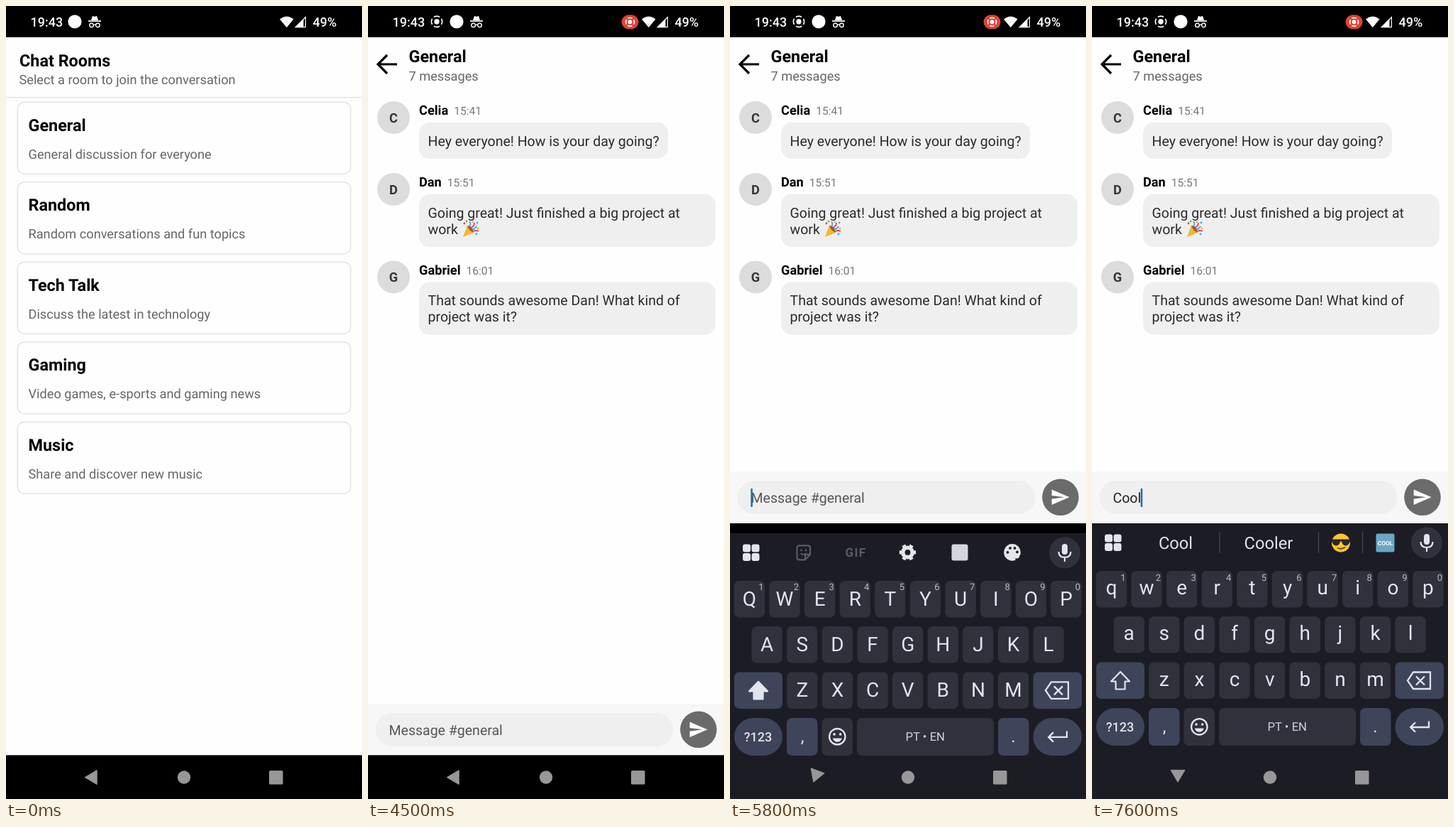
An HTML page for the animation above (8 s loop, 502 px wide and 1116 px high).

```html
<!DOCTYPE html>
<html lang="en">
<head>
<meta charset="utf-8">
<title>Chat rooms</title>
<style>
html, body { margin: 0; width: 100%; height: 100%; overflow: hidden; background: #fefefe; }
svg { display: block; width: 100%; height: 100%; }
text { font-family: Roboto, sans-serif; white-space: pre; text-rendering: geometricPrecision; }
</style>
</head>
<body>
<svg id="stage" viewBox="0 0 502 1116"></svg>
<script>
const LOOP = 8000, STEP = 100;
const SMALL = 18.2, BODY = 19.52, TITLE = 23.4;
const BAR_RISE = 327, KEYBOARD_TOP = 728, KEYBOARD_HEIGHT = 388;
const KEY = '#31313b', ACTION = '#3e4459', INK = '#e4e4ee', PANEL = '#1c1c25';

// Moments in ms
const RECORDING = 80, PRESS = 2800, ENTER = 2900, FOCUS = 5600, KEYBOARD = 5650, TYPE = 6800;

const text = (x, y, size, fill, str, extra = '') =>
  `<text x="${x}" y="${y}" font-size="${size}" fill="${fill}" ${extra}>${str}</text>`;
const bold = 'font-weight="700"', middle = 'text-anchor="middle"';
const rect = (x, y, w, h, r, fill, extra = '') =>
  `<rect x="${x}" y="${y}" width="${w}" height="${h}" rx="${r}" fill="${fill}" ${extra}/>`;
const disc = (x, y, r, fill, extra = '') => `<circle cx="${x}" cy="${y}" r="${r}" fill="${fill}" ${extra}/>`;
const line = (d, color, width, extra = '') =>
  `<path d="${d}" fill="none" stroke="${color}" stroke-width="${width}" ${extra}/>`;
const shape = (d, fill) => `<path d="${d}" fill="${fill}"/>`;
const group = (id, content, extra = '') => `<g id="${id}" ${extra}>${content}</g>`;
const at = (x, y, content) => `<g transform="translate(${x} ${y})">${content}</g>`;

// Status and navigation bars
const recordMark = r => disc(0, 0, r * .48, '#fff') +
  disc(0, 0, r, 'none', 'stroke="#fff" stroke-width="1.7" pathLength="8" stroke-dasharray="1.45 .55" stroke-dashoffset=".72"');

function statusBar() {
  const incognito = shape('M-5 -2 -3 -8 0 -7 3 -8 5 -2Z', '#fff') +
    line('M-9 -.8H9', '#fff', 1.8) +
    line('M-1.6 4.8Q0 3.6 1.6 4.8', '#fff', 1.2) +
    [-4.4, 4.4].map(x => disc(x, 5, 2.8, 'none', 'stroke="#fff" stroke-width="1.4"')).join('');
  return rect(0, 0, 502, 44, 0, '#000') +
    text(34.5, 29.3, 18, '#fff', '19:43', 'font-weight="500"') +
    at(97, 22, group('record', recordMark(7.6))) +
    group('notices', disc(97, 22, 9.6, '#fff') + at(125, 22, incognito)) +
    at(369.5, 22.5, group('chip', rect(-12, -10, 24, 20, 10, '#e24234') + recordMark(6))) +
    shape('M386 18.5Q395.7 10.8 405.5 18.5L395.8 30.3Z', '#fff') +
    shape('M407 30.3 419.5 18V30.3Z', '#fff') +
    line('M408.5 29.7 422.4 15.8V29.7Z', '#fff', 1.2) +
    text(432.5, 29.3, 18, '#fff', '49%', 'font-weight="500"');
}

const navButtons = () =>
  group('back', '<path d="M-8.7 0 8.2-10V10Z" fill="#979797" stroke="#979797" stroke-linejoin="round"/>') +
  disc(251, 1085.5, 9.2, '#979797') + rect(371, 1076, 19.5, 19.5, 1.5, '#979797');

// Room list
const rooms = [
  ['General', 'General discussion for everyone'],
  ['Random', 'Random conversations and fun topics'],
  ['Tech Talk', 'Discuss the latest in technology'],
  ['Gaming', 'Video games, e-sports and gaming news'],
  ['Music', 'Share and discover new music']
];

const roomList = () =>
  text(19, 84.5, TITLE, '#000', 'Chat Rooms', bold) +
  text(18.5, 110.3, SMALL, '#666', 'Select a room to join the conversation') +
  rect(0, 128, 502, 1.3, 0, '#e1e1e1') +
  rooms.map(([name, about], i) => at(0, i * 112.5, group('room' + i,
    rect(16.2, 135.3, 469.8, 101, 10, '#fefefe', 'stroke="#e0e0e0" stroke-width="1.3"') +
    text(31.5, 175.8, TITLE, '#000', name, bold) +
    text(31.5, 214.8, SMALL, '#666', about)))).join('');

// Chat
const popper = () => shape('M1 23 7 7Q14 10 16 17Z', '#f5b62e') +
  shape('M7 7Q15 7 16 17Q9 14 7 7Z', '#9a5a32') +
  line('M10 8Q13 5 10 1M14 12Q18 12 20 8', '#4fa3e3', 1.8) +
  line('M12 10Q17 8 17 3M16 15Q19 13 23 15', '#e0455c', 1.8) +
  [[3, 4, '#e0455c'], [15, 2, '#f5b62e'], [21, 3, '#4fa3e3'], [22, 11, '#f5b62e'], [20, 19, '#4fa3e3'], [6, 1, '#5fb85a']]
    .map(([x, y, c]) => disc(x, y, 1.4, c)).join('');

const messages = [
  { y: 157, name: 'Celia', time: '15:41', width: 351, lines: ['Hey everyone! How is your day going?'] },
  { y: 258, name: 'Dan', time: '15:51', width: 418, lines: ['Going great! Just finished a big project at', 'work'] },
  { y: 381.6, name: 'Gabriel', time: '16:01', width: 418, lines: ['That sounds awesome Dan! What kind of', 'project was it?'] }
];

const message = ({ y, name, time, width, lines }) => at(0, y,
  disc(36, 0, 23, '#dcdcdc') +
  text(36, 6.5, SMALL, '#333', name[0], bold + middle) +
  text(72, -4, SMALL, '#000', `${name}<tspan dx="8" font-size="15.6" font-weight="400" fill="#777">${time}</tspan>`, bold) +
  rect(72, 6.8, width, 28.3 + 23 * lines.length, 15, '#efefef') +
  lines.map((s, i) => text(84.5, 39.7 + 23 * i, BODY, '#2b2b2b', s)).join(''));

const chat = () =>
  line('M41 82H14M27 69 14 82 27 95', '#000', 3.2) +
  text(57.5, 79.3, TITLE, '#000', 'General', bold) +
  text(57.5, 105.3, SMALL, '#666', '7 messages') +
  messages.map(message).join('') + at(133, 302, popper());

const inputBar = () =>
  rect(0, 982, 502, 73, 0, '#f7f7f7') +
  rect(10.5, 995, 420, 47, 23.5, '#efefef') +
  text(29.5, 1025.7, BODY, '#555', '', 'id="entry"') +
  rect(29.3, 1006, 2.5, 26, 0, '#1b6fa9', 'id="cursor"') +
  disc(466, 1018.3, 25.8, '#6b6b6b') +
  `<path transform="translate(451.3 1004) scale(1.19)" d="M2 21 23 12 2 3V10L17 12 2 14Z" fill="#fff"/>`;

// Keyboard
const PITCH = 49.62;
const rows = [['qwertyuiop', 27.4, 795], ['asdfghjkl', 52.2, 859], ['zxcvbnm', 101.8, 923.5]];
const keys = {};
rows.forEach(([letters, x, y]) => [...letters].forEach((c, i) => keys[c] = { x: x + i * PITCH, y }));

function keyFace(c, { x, y }) {
  const digit = y === 795 ? text(x + 16.5, 808.5, 13, '#bcbcc8', ('qwertyuiop'.indexOf(c) + 1) % 10, middle) : '';
  return rect(x - 21.7, y, 43.4, 51.5, 7, KEY, `id="face-${c}"`) +
    group('cap-' + c, text(x, y, 28, INK, '', `id="letter-${c}" ${middle}`) + digit);
}

const gear = () =>
  disc(0, 0, 6.7, 'none', `stroke="${INK}" stroke-width="5.6"`) +
  disc(0, 0, 9.8, 'none', `stroke="${INK}" stroke-width="3.8" pathLength="12" stroke-dasharray="1" stroke-dashoffset=".5"`);

const palette = () => disc(0, 0, 11.8, INK) + disc(9, 9, 4.6, PANEL) + disc(6.5, 5, 3.5, INK) +
  [[-6.5, 0], [-3, -6], [3.5, -6], [7, -.5]].map(([x, y]) => disc(x, y, 1.9, PANEL)).join('');

const tools = () => {
  const dim = '#5b5b64';
  return line('M98 745.5H110Q113 745.5 113 748.5V758L106 765.5H98Q94.5 765.5 94.5 762V749Q94.5 745.5 98 745.5ZM113 758H106V765', dim, 2.2) +
    disc(100.5, 752, 1.4, dim) + disc(107, 752, 1.4, dim) + line('M99.5 756.5Q103 760 107 756.5', dim, 1.8) +
    text(177.5, 761.3, 17, dim, 'GIF', bold + middle + ' letter-spacing="1.3"') +
    at(250.5, 755, gear()) + rect(312.5, 743.5, 23, 23, 3, '#d5d5de') + at(398, 755, palette());
};

const coolFace = () => disc(0, 0, 13, '#fcc631') +
  shape('M-13 -5H13V-2Q11 4 6 4 2 3 1 -2H-1Q-2 3 -6 4-11 4-13 -2Z', '#26282d') +
  line('M-5 7Q1 10 6 6', '#6b4420', 1.8);
const coolBadge = () => rect(-13, -13, 26, 26, 2, '#6ba6c4') +
  text(0, 3, 8.4, '#fff', 'COOL', bold + middle);

function keyboard() {
  const grid = [[18, 743.5], [30.5, 743.5], [18, 756], [30.5, 756]]
    .map(([x, y]) => rect(x, y, 11, 11, 3, INK)).join('');
  const divider = x => rect(x - .6, 740, 1.2, 30, 0, '#484852');
  const mic = disc(472, 755.5, 22, '#30313b') + rect(468, 743, 8, 15, 4, INK) +
    line('M463.5 754Q463.5 762 472 762T480.5 754M472 762V768', INK, 2.2);
  const words = [118, 249, 385].map((x, i) => text(x, 764, 23.7, INK, '', `id="word${i}" ${middle}`)).join('');
  const letters = Object.entries(keys).map(([c, k]) => keyFace(c, k)).join('');
  const controls = rect(6, 923.5, 68, 51.5, 7, ACTION) +
    `<path id="shift" d="M40 937 53 950.5H46.5V961.5H33.5V950.5H27Z" stroke="${INK}" stroke-width="2.2" stroke-linejoin="round"/>` +
    rect(427.5, 923.5, 68.5, 51.5, 7, ACTION) +
    line('M445 949.3 453 937.5H477V961H453ZM457 943.5 469 955.5M469 943.5 457 955.5', INK, 2.3) +
    rect(6, 988, 68, 53, 26.5, ACTION) + text(39.5, 1020.8, 18, INK, '?123', middle + ' font-weight="500"') +
    rect(80, 988, 43.5, 53, 7, ACTION) + text(102, 1022, 24, INK, ',', middle) +
    rect(129.5, 988, 43.5, 53, 7, KEY) +
    disc(151.3, 1014.3, 11.2, 'none', `stroke="${INK}" stroke-width="2.3"`) +
    disc(147, 1011, 1.8, INK) + disc(155.6, 1011, 1.8, INK) + shape('M144.8 1016.5H157.8Q156 1021.8 151.3 1021.8T144.8 1016.5Z', INK) +
    rect(179, 988, 193, 53, 7, KEY) + text(275.3, 1020, 16.7, '#d2d2dc', 'PT • EN', middle) +
    rect(378, 988, 43.5, 53, 7, ACTION) + text(399.5, 1022, 24, INK, '.', middle) +
    rect(427.5, 988, 68.5, 53, 26.5, ACTION) +
    line('M475 1006.5V1015H449.5M456 1008.2 449.2 1015 456 1021.8', INK, 2.3);
  const popup = group('popup', disc(0, 0, 34.6, '#31323c') +
    text(0, 10, 28, INK, '', `id="popupLetter" ${middle}`) +
    group('popupDots', [-5, 0, 5].map(x => disc(x, 25.5, 1.4, INK)).join('')));
  return rect(0, KEYBOARD_TOP, 502, KEYBOARD_HEIGHT, 0, PANEL) + grid + mic + group('tools', tools()) +
    group('words', divider(180) + divider(319.5) + words +
      group('emoji', divider(381.5) + at(351, 755.5, coolFace()) + at(413.5, 755.5, coolBadge()))) +
    letters + controls + popup;
}

document.getElementById('stage').innerHTML =
  rect(0, 0, 502, 1116, 0, '#fefefe') +
  group('rooms', roomList()) + group('chat', chat()) +
  rect(0, KEYBOARD_TOP, 502, KEYBOARD_HEIGHT, 0, '#000', 'id="shade"') +
  group('input', inputBar()) + rect(0, 1054.3, 502, 62, 0, '#000') +
  group('keyboard', keyboard()) + navButtons() + statusBar();

const $ = id => document.getElementById(id);
const show = (id, on) => $(id).setAttribute('display', on ? 'inline' : 'none');
const fade = (id, opacity) => $(id).setAttribute('opacity', opacity);
const move = (id, x, y, more = '') => $(id).setAttribute('transform', `translate(${x} ${y}) ${more}`);
const progress = (t, from, duration) => Math.max(0, Math.min(1, (t - from) / duration));

// Bezier easing with control points (x1, 0) and (.2, 1), solved by bisection
const bezier = x1 => x => {
  let low = 0, high = 1;
  for (let i = 0; i < 24; i++) {
    const s = (low + high) / 2, r = 1 - s;
    if (3 * s * r * r * x1 + .6 * s * s * r + s ** 3 < x) low = s; else high = s;
  }
  return x <= 0 ? 0 : x >= 1 ? 1 : low * low * (3 - 2 * low);
};
const fastOut = bezier(.4), slowIn = bezier(0);

// Typing: start time, entered text, pressed key, suggestions
const typing = [
  [0, '', '', null],
  [TYPE, '', 'c', null],
  [6900, 'C', '', ['C', 'Com', 'Como']],
  [7000, 'C', 'o', ['C', 'Com', 'Como']],
  [7100, 'Co', 'o', ['Co', 'Como', 'Cook']],
  [7200, 'Coo', 'o', ['Co', 'Como', 'Cook']],
  [7300, 'Coo', '', ['Coo', 'Cool', 'Cook']],
  [7500, 'Cool', 'l', ['Coo', 'Cool', 'Cook']],
  [7600, 'Cool', '', ['Cool', 'Cooler', '']]
];

function drawStatus(t) {
  move('notices', 28 * fastOut(progress(t, RECORDING, 360)), 0);
  const appear = fastOut(progress(t, RECORDING + 50, 200));
  fade('record', appear);
  fade('chip', appear);
}

function drawKeyboard(t) {
  const p = progress(t, KEYBOARD, 200);
  const turn = fastOut(progress(t, KEYBOARD + 50, 200));
  show('keyboard', p > 0);
  move('keyboard', 0, KEYBOARD_HEIGHT * (1 - slowIn(p)));
  fade('keyboard', Math.min(1, 2 * p));
  move('back', 120 + turn, 1085.5 - 2 * turn, `rotate(${-90 * turn})`);
}

function drawTyping(t) {
  const [, entered, pressed, words] = typing.filter(s => s[0] <= t).pop();
  const lower = entered !== '';
  const cased = c => lower ? c : c.toUpperCase();
  const entry = $('entry');
  entry.textContent = entered || 'Message #general';
  entry.setAttribute('fill', entered ? '#222' : '#555');
  $('cursor').setAttribute('x', 29.3 + (entered ? entry.getComputedTextLength() - .3 : 0));
  const blinkOn = Math.floor((t - FOCUS) / 500) % 2 === 0;
  show('cursor', t >= FOCUS && (blinkOn || t >= TYPE));

  for (const c in keys) {
    const letter = $('letter-' + c);
    letter.textContent = cased(c);
    letter.setAttribute('y', keys[c].y + (lower ? 33.3 : 35));
    show('face-' + c, c !== pressed);
    fade('cap-' + c, c === pressed ? .3 : 1);
  }
  $('shift').setAttribute('fill', lower ? 'none' : INK);

  show('tools', !words);
  show('words', words);
  if (words) words.forEach((w, i) => $('word' + i).textContent = w);
  show('emoji', words && !words[2]);

  show('popup', pressed);
  if (pressed) {
    const { x, y } = keys[pressed];
    move('popup', x, y - 43);
    $('popupLetter').textContent = cased(pressed);
    show('popupDots', pressed !== 'l');
  }
}

function render(time) {
  const t = Math.floor(time / STEP) * STEP;
  const inChat = t >= ENTER, raised = t >= KEYBOARD;
  drawStatus(t);
  show('rooms', !inChat);
  show('chat', inChat);
  show('input', inChat);
  show('shade', raised);
  fade('room0', t >= PRESS ? .2 : 1);
  move('input', 0, raised ? -BAR_RISE : 0);
  drawKeyboard(t);
  drawTyping(t);
}

const start = performance.now();
function tick() {
  render((performance.now() - start) % LOOP);
  requestAnimationFrame(tick);
}
tick();
</script>
</body>
</html>
```
